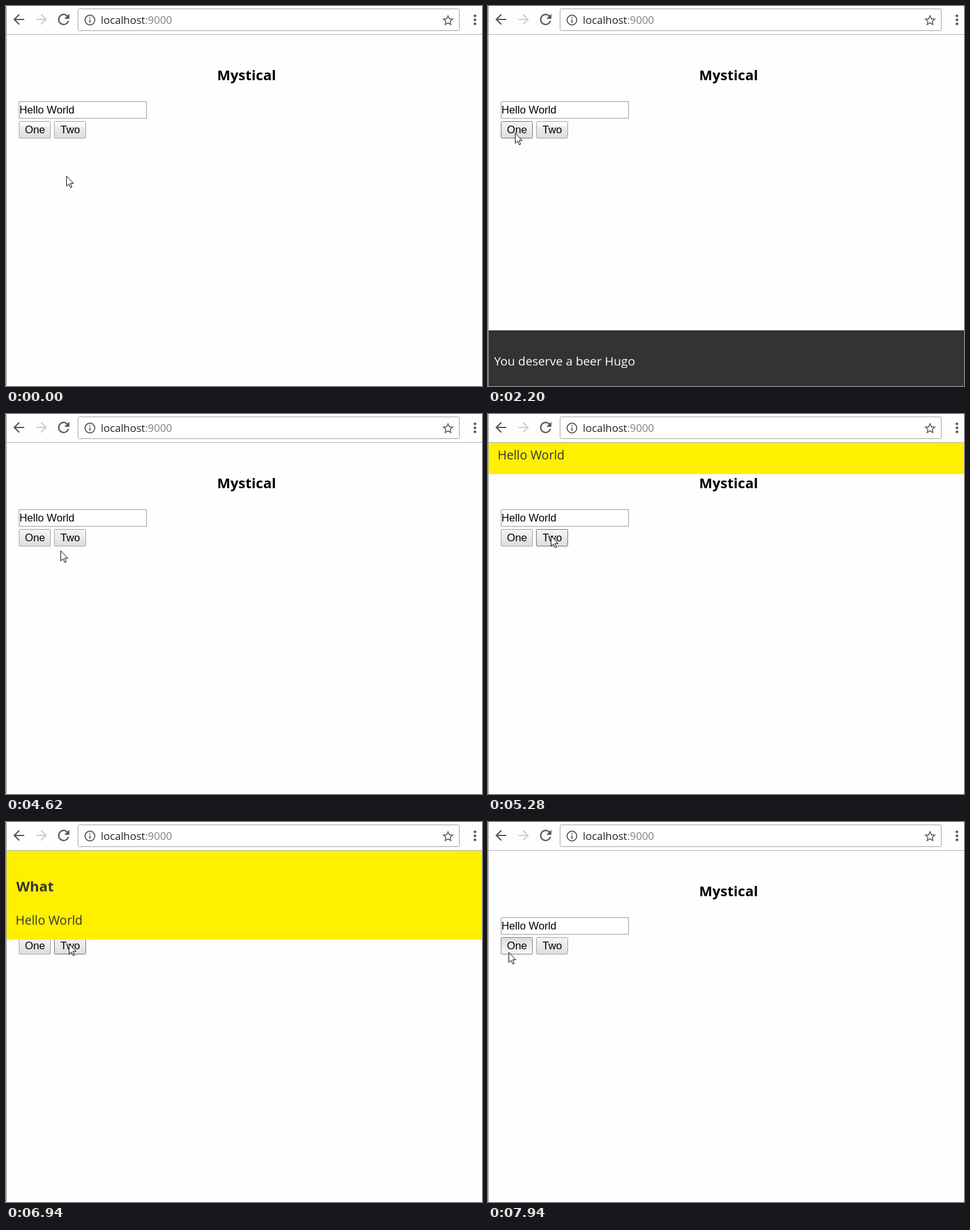
These frames come from a looping animation (743x594 px, 8000 ms). An HTML page:

```html
<!DOCTYPE html>
<html lang="en">
<head>
<meta charset="utf-8">
<title>Mystical</title>
<style>
  html, body { margin: 0; width: 100%; height: 100%; overflow: hidden; background: #fefefe; }
  svg { display: block; }
  text { font-family: "Open Sans", "Noto Sans", sans-serif; white-space: pre; }
  .bold { font-size: 22px; font-weight: 700; }
  .copy { font-size: 19.2px; }
  .control { font: 16.67px "Liberation Sans", Arial, sans-serif; }
  .look { opacity: 0; }
</style>
</head>
<body>
<svg width="743" height="594" viewBox="0 0 743 594">
  <defs>
    <linearGradient id="glossy" x2="0" y2="1">
      <stop offset="0" stop-color="#fefefe"/><stop offset=".3" stop-color="#f8f8f8"/>
      <stop offset=".3" stop-color="#ececee"/><stop offset="1" stop-color="#dedee2"/>
    </linearGradient>
    <linearGradient id="plain" x2="0" y2="1">
      <stop offset="0" stop-color="#f5f5f5"/><stop offset="1" stop-color="#dddddd"/>
    </linearGradient>
    <linearGradient id="pressed" x2="0" y2="1">
      <stop offset="0" stop-color="#dcdcde"/><stop offset="1" stop-color="#f8f8f8"/>
    </linearGradient>
    <clipPath id="page"><rect x="1" y="45" width="742" height="549"/></clipPath>
    <path id="back" d="M20 11H7.83l5.59-5.59L12 4l-8 8 8 8 1.41-1.41L7.83 13H20z"/>
  </defs>

  <rect width="743" height="594" fill="#fefefe"/>

  <g id="content">
    <text class="bold" x="375.5" y="116" text-anchor="middle">Mystical</text>
    <rect x="20.5" y="149.5" width="199" height="26" fill="#fff" stroke="#a2a2a2"/>
    <text class="control" x="21" y="168">Hello World</text>
    <g id="buttons"></g>
  </g>

  <g clip-path="url(#page)">
    <g id="notice">
      <rect x="1" y="45" width="742" height="142" fill="#fff000"/>
      <g fill="#333">
        <text class="bold" x="16" y="112">What</text>
        <text class="copy" x="15" y="164">Hello World</text>
      </g>
    </g>
    <g id="toast">
      <rect x="1" y="502" width="742" height="92" fill="#333"/>
      <text x="9.5" y="557" font-size="18.9" fill="#fff">You deserve a beer Hugo</text>
    </g>
  </g>

  <g id="toolbar" fill="#5a5a5a">
    <path d="M.5 0V594" stroke="#9a9a9a"/>
    <path d="M0 44.5H743" stroke="#b4b4b4"/>
    <rect x="112.5" y="4.5" width="595" height="34" rx="2" fill="#fff" stroke="#a6a6a6"/>
    <use href="#back" transform="translate(7.2 8.3) scale(1.06)"/>
    <use href="#back" transform="translate(68.2 8.3) scale(-1.06 1.06)" fill="#cfcfcf"/>
    <path transform="translate(76.6 7.6) scale(1.12)" d="M17.65 6.35A7.96 7.96 0 0 0 12 4a8 8 0 1 0 7.73 10h-2.08A6 6 0 1 1 12 6c1.66 0 3.14.69 4.22 1.78L13 11h7V4z"/>
    <circle cx="131" cy="22" r="7.6" fill="none" stroke="#5a5a5a" stroke-width="1.7"/>
    <path d="M130.1 17.4h1.8v1.9h-1.8zM130.1 21h1.8v5.3h-1.8z"/>
    <text x="148" y="28" font-size="16.5" fill="#222">localhost<tspan fill="#808080">:9000</tspan></text>
    <path transform="translate(679.2 11.6) scale(.9)" d="M22 9.24l-7.19-.62L12 2 9.19 8.63 2 9.24l5.46 4.73L5.82 21 12 17.27 18.18 21l-1.63-7.03zM12 15.4l-3.76 2.27 1-4.28-3.32-2.88 4.38-.38L12 6.1l1.71 4.04 4.38.38-3.32 2.88 1 4.28z"/>
    <circle cx="732" cy="15.3" r="2.1"/><circle cx="732" cy="21.6" r="2.1"/><circle cx="732" cy="27.9" r="2.1"/>
  </g>

  <g id="pointer" fill="#fff" stroke="#111" stroke-linejoin="round">
    <path id="arrow" d="M.5.8V16.6L4.2 13.2L6.7 19L9 18L6.5 12.3H11.4z"/>
    <g id="hand" transform="translate(-6 0)">
      <path d="M5.5 14V2.5a1.6 1.6 0 0 1 3.2 0V8.5q1.5-1 2.6.4q1.5-.8 2.6.6q2.2-.4 2.4 1.7V16q0 3-1.8 4.5V23H7V21L1.3 14.5q-.8-1.8.9-2.3q1.6 0 3.3 1.8z"/>
      <path d="M8.7 8.5v4M11.3 9v3.5M13.9 9.6v3" fill="none" stroke-width=".8"/>
    </g>
  </g>
</svg>

<script>
const LOOP = 8000;
const byId = id => document.getElementById(id);

// Plays [ms, style] pairs, each held until the next.
function play(el, steps) {
  const frames = steps.map(([ms, style]) => ({ ...style, offset: ms / LOOP, easing: 'steps(1, end)' }));
  frames.push({ ...steps[steps.length - 1][1], offset: 1 });
  el.animate(frames, { duration: LOOP, iterations: Infinity });
}

const even = n => Array.from({ length: n }, (_, i) => (i + 1) / n);
const spread = (start, end, progress, style) =>
  progress.map((p, i) => [start + (end - start) * i / (progress.length - 1), style(p)]);
const shift = (x, y) => ({ transform: `translate(${x}px, ${y}px)` });
const smooth = p => p * p * (3 - 2 * p);

// Same curve as the CSS "ease" keyword.
function ease(p) {
  const curve = (s, a, b) => 3 * a * s * (1 - s) ** 2 + 3 * b * s * s * (1 - s) + s ** 3;
  let low = 0, high = 1;
  for (let i = 0; i < 20; i++) {
    const mid = (low + high) / 2;
    if (curve(mid, .25, .25) < p) low = mid; else high = mid;
  }
  return curve(high, .1, 1);
}

function slide(el, hidden, enter, leave) {
  play(el, [
    [0, shift(0, hidden)],
    ...spread(...enter, p => shift(0, hidden * (1 - ease(p)))),
    ...spread(...leave, p => shift(0, hidden * ease(p)))
  ]);
}

function movePointer(start, moves) {
  let [x, y] = start;
  const steps = [[0, shift(x, y)]];
  for (const [from, to, count, nextX, nextY] of moves) {
    const [oldX, oldY] = [x, y];
    steps.push(...spread(from, to, even(count), p => {
      const k = smooth(p);
      return shift(Math.round(oldX + (nextX - oldX) * k), Math.round(oldY + (nextY - oldY) * k));
    }));
    [x, y] = [nextX, nextY];
  }
  play(byId('pointer'), steps);
}

const borders = { glossy: '#a6a6a6', plain: '#a6a6a6', hover: '#777', pressed: '#858585' };

function addButton(label, x, states) {
  const group = document.createElementNS('http://www.w3.org/2000/svg', 'g');
  group.innerHTML = Object.entries(borders).map(([look, border]) =>
    `<rect class="look" x="${x + .5}" y="180.5" width="49" height="26" rx="1"
      fill="url(#${look === 'hover' ? 'plain' : look})" stroke="${border}"/>`).join('') +
    `<text class="control" x="${x + 25.2}" y="199" text-anchor="middle">${label}</text>`;
  byId('buttons').append(group);
  Object.keys(borders).forEach((look, i) =>
    play(group.children[i], states.map(([ms, state]) => [ms, { opacity: state === look ? 1 : 0 }])));
}

addButton('One', 20, [[0, 'glossy'], [1220, 'hover'], [1670, 'pressed'], [1780, 'hover'],
  [2946, 'plain'], [7674, 'hover'], [7940, 'pressed']]);
addButton('Two', 75, [[0, 'glossy'], [2946, 'plain'], [4790, 'hover'], [5010, 'pressed'],
  [5110, 'hover'], [7562, 'plain']]);

slide(byId('toast'), 92, [1970, 2290, even(7)], [4040, 4130, [.2, .5, 1]]);
slide(byId('notice'), -142, [5210, 5600, even(9)], [6940, 7160, [.04, .2, .4, .6, 1]]);

movePointer([94, 265], [
  [810, 1350, 9, 42, 198],
  [2890, 3558, 13, 298, 558],
  [4270, 4618, 7, 85, 213],
  [4690, 4840, 4, 98, 190],
  [7450, 7730, 6, 32, 203]
]);
play(byId('arrow'), [[0, { opacity: 1 }], [3390, { opacity: 0 }], [4130, { opacity: 1 }]]);
play(byId('hand'), [[0, { opacity: 0 }], [3390, { opacity: 1 }], [4130, { opacity: 0 }]]);
</script>
</body>
</html>
```
